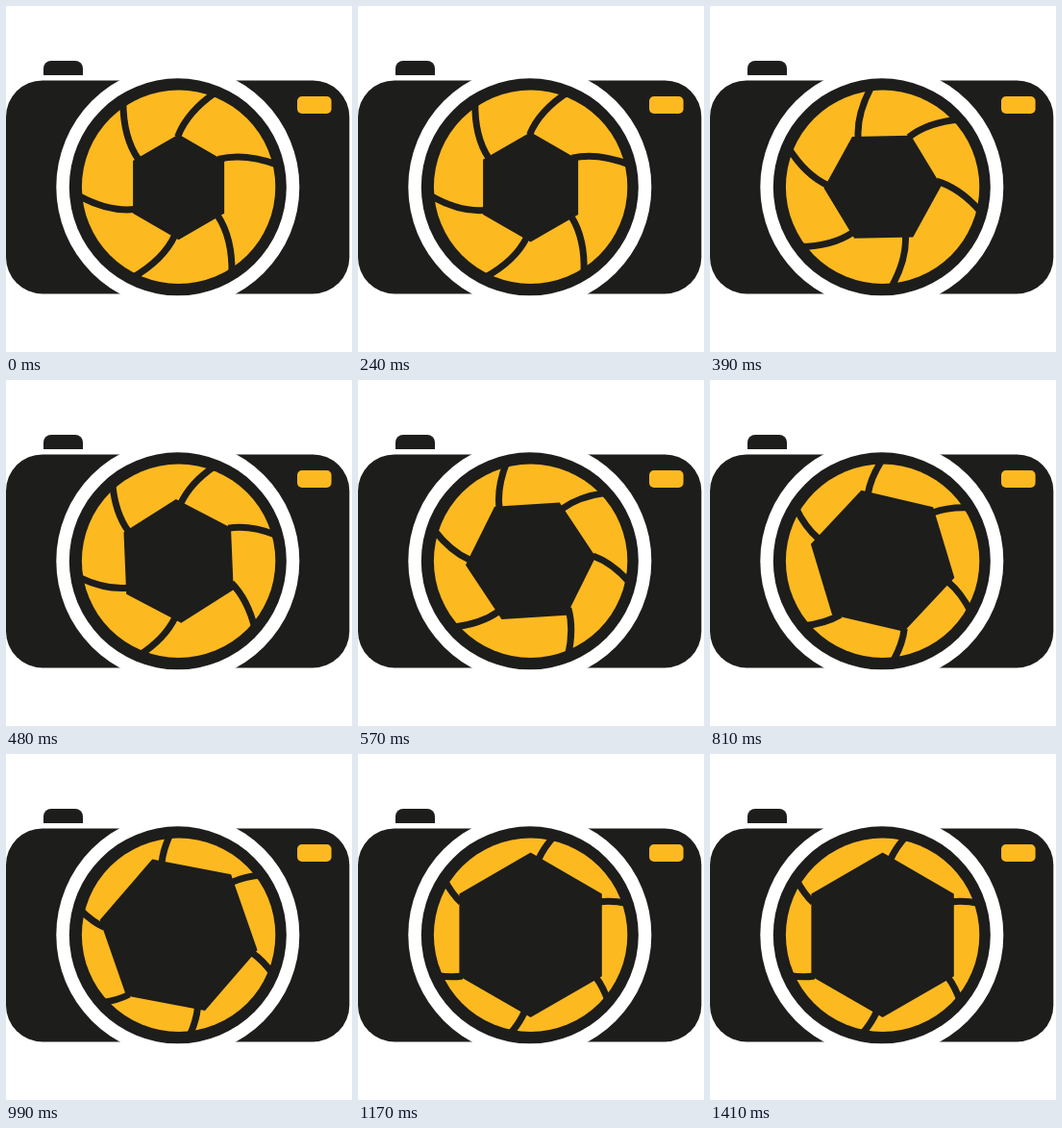
These frames come from a looping animation (360x360 px, 1440 ms). An HTML page with a canvas:

```html
<!DOCTYPE html>
<html lang="en">
<head>
<meta charset="utf-8">
<title>Camera iris</title>
<style>
  html, body { margin: 0; width: 100%; height: 100%; overflow: hidden; background: #fff; }
  canvas { display: block; width: 360px; height: 360px; }
</style>
</head>
<body>
<canvas id="stage"></canvas>
<script>
const LOOP = 1440, STEP = 30;
const SPIN_START = 300, SPIN_TIME = 750, SPIN = 240;
const DARK = '#1d1d1b', AMBER = '#fdb920', WHITE = '#fff';
const CX = 179.6, CY = 188.3;
// Each blade seam is turned slightly away from its corner (degrees).
const SEAM_TURNS = [-5, 6, 4.5, 3, 4.5, -1];

const canvas = document.getElementById('stage');
const ctx = canvas.getContext('2d');
const scale = window.devicePixelRatio || 1;
canvas.width = canvas.height = 360 * scale;

const rad = deg => deg * Math.PI / 180;
const clamp = v => Math.min(1, Math.max(0, v));
const polar = (r, deg) => [r * Math.cos(rad(deg)), r * Math.sin(rad(deg))];

function box(x, y, w, h, radii, color) {
  ctx.fillStyle = color;
  ctx.beginPath();
  ctx.roundRect(x, y, w, h, radii);
  ctx.fill();
}

function disc(r, color) {
  ctx.fillStyle = color;
  ctx.beginPath();
  ctx.arc(CX, CY, r, 0, Math.PI * 2);
  ctx.fill();
}

function drawBody() {
  box(39, 57, 41, 15, [8, 8, 0, 0], DARK);
  box(0, 77.4, 357.3, 222, 38, DARK);
  box(303, 94, 35.6, 18, 5, AMBER);
  ctx.save();
  ctx.translate(-0.8, 0);
  disc(126.5, WHITE);
  disc(113, DARK);
  ctx.restore();
  disc(100.7, AMBER);
}

function drawSeam(apothem, open, turn) {
  const startX = apothem / Math.cos(rad(30 - Math.abs(turn))) - 2;
  const [endX, endY] = polar(106, 22.5 - 15 * open);
  const dx = endX - startX;
  const bend = Math.atan2(endY, dx) - rad(20 - 10 * open);
  const reach = 0.45 * Math.hypot(dx, endY);
  ctx.save();
  ctx.rotate(rad(turn));
  ctx.beginPath();
  ctx.moveTo(startX, 0);
  ctx.quadraticCurveTo(startX + reach * Math.cos(bend), reach * Math.sin(bend), endX, endY);
  ctx.stroke();
  ctx.restore();
}

function drawIris(time) {
  const open = clamp((time - SPIN_START) / SPIN_TIME);
  const apothem = 47.5 + 2.5 * clamp(time / SPIN_START) + 24.2 * open;
  const radius = apothem / Math.cos(rad(30));

  ctx.save();
  ctx.beginPath();
  ctx.arc(CX, CY, 102, 0, Math.PI * 2);
  ctx.clip();
  ctx.translate(CX, CY);
  ctx.rotate(rad(SPIN * open - 30));

  ctx.fillStyle = ctx.strokeStyle = DARK;
  ctx.lineWidth = 7;
  ctx.beginPath();
  for (let i = 0; i < 6; i++) ctx.lineTo(...polar(radius, i * 60));
  ctx.fill();

  for (const turn of SEAM_TURNS) {
    drawSeam(apothem, open, turn);
    ctx.rotate(rad(60));
  }
  ctx.restore();
}

function render(now) {
  const time = Math.floor((now % LOOP) / STEP) * STEP;
  ctx.setTransform(scale, 0, 0, scale, 0, 0);
  ctx.fillStyle = WHITE;
  ctx.fillRect(0, 0, 360, 360);
  drawBody();
  drawIris(time);
}

const start = performance.now();
function tick() {
  render(performance.now() - start);
  requestAnimationFrame(tick);
}
tick();
</script>
</body>
</html>
```
